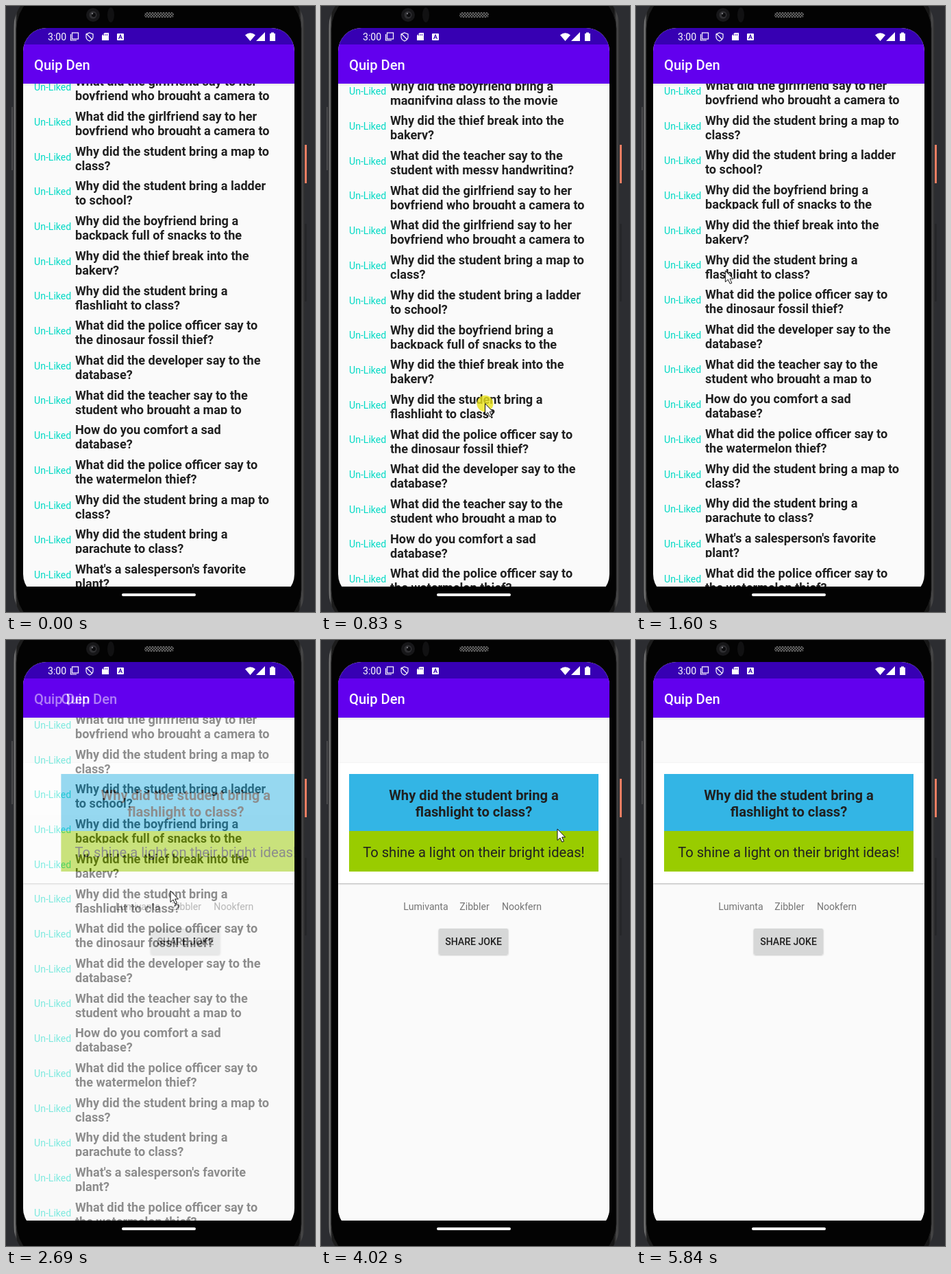
Write an HTML page that moves like this. It is 451 by 882 pixels and loops after 6.44 s.

```html
<!DOCTYPE html>
<html lang="en">
<head>
<meta charset="utf-8">
<title>Joke list</title>
<style>
html, body { margin: 0; width: 100%; height: 100%; overflow: hidden; background: #2c2d31; }
svg { display: block; font-family: Roboto, sans-serif; }
#stage { position: absolute; left: 0; top: 0; }
.bold { font-weight: 700; fill: #202020; }
.medium { font-weight: 500; }
.mid { text-anchor: middle; }
.like { font-size: 14.1px; fill: #03dac5; }
.joke { font-size: 18.1px; }
.large { font-size: 20.15px; }
.small { font-size: 14.1px; }
</style>
</head>
<body>
<svg id="stage" width="451" height="882" viewBox="0 0 451 882">
  <defs>
    <linearGradient id="rim">
      <stop offset="0" stop-color="#3a3a3b"/><stop offset=".004" stop-color="#7c7c7c"/>
      <stop offset=".012" stop-color="#1c1c1c"/><stop offset=".98" stop-color="#161616"/>
      <stop offset=".99" stop-color="#4b4b4c"/><stop offset="1" stop-color="#2a2a2b"/>
    </linearGradient>
    <pattern id="mesh" width="4" height="4" patternUnits="userSpaceOnUse">
      <rect width="4" height="4" fill="#1c1c1c"/>
      <path d="M0 0L4 4M4 0L0 4" stroke="#6a6a6a" stroke-width=".9"/>
    </pattern>
    <linearGradient id="shade" x2="0" y2="1">
      <stop offset="0" stop-opacity=".08"/><stop offset="1" stop-opacity="0"/>
    </linearGradient>
    <clipPath id="glass"><rect x="25" y="32" width="396" height="829" rx="34"/></clipPath>
    <clipPath id="body"><rect x="25" y="113" width="396" height="732"/></clipPath>
    <filter id="soft" x="-10%" y="-20%" width="120%" height="150%">
      <feDropShadow dx="0" dy="1" stdDeviation="1.3" flood-opacity=".3"/>
    </filter>
  </defs>

  <rect width="451" height="882" fill="#2c2d31"/>
  <rect x="8" y="147" width="2" height="92" fill="#4a4a4c"/>
  <rect x="435" y="202" width="4" height="56" fill="#ee7e63"/>
  <rect x="435" y="317" width="4" height="113" rx="1" fill="#252629"/>
  <rect x="11" y="-27" width="425" height="937" rx="60" fill="url(#rim)"/>
  <rect x="15" y="-23" width="416" height="929" rx="56" fill="#030303" stroke="#1c1c1c"/>
  <circle cx="127" cy="13" r="10" fill="#171719"/>
  <circle cx="127" cy="13" r="5.5" fill="#303033"/>
  <circle cx="128" cy="13" r="3" fill="#0c0c0e"/>
  <circle cx="126" cy="11" r="1.2" fill="#77777c"/>
  <ellipse cx="153" cy="13" rx="5" ry="11" fill="#111112"/>
  <rect x="202" y="9" width="43" height="8" rx="4" fill="url(#mesh)"/>
  <rect x="169" y="855" width="108" height="4" rx="2" fill="#fff"/>

  <g clip-path="url(#glass)">
    <rect x="25" y="32" width="396" height="813" fill="#fafafa"/>
    <rect x="25" y="32" width="396" height="24" fill="#3700b3"/>
    <rect x="25" y="56" width="396" height="57" fill="#6200ee"/>
    <g fill="#fff">
      <text class="small" x="61" y="49.5">3:00</text>
      <g fill="none" stroke="#fff" stroke-width="1.2">
        <rect x="96.5" y="39" width="9" height="9"/>
        <path d="M94.5 41V50H103M122 39L127 41V45Q127 49 122 51Q117 49 117 45V41ZM118 41L126 49"/>
      </g>
      <path d="M144 39H150V50H140V43Z"/>
      <rect x="162" y="40" width="10" height="10" rx="1"/>
      <path d="M349 42.3Q356.5 36 364 42.3L356.5 51ZM365 51L378 38V51ZM385 40H387V38.5H391V40H393V51H385Z"/>
    </g>
    <g fill="none" stroke="#3700b3">
      <path d="M164.5 48L167 42L169.5 48M165.5 46H168.5" stroke-width="1.2"/>
      <path d="M142.5 43V41M145 43V41M147.5 43V41"/>
    </g>

    <text class="medium large" x="41" y="92.5" fill="#fff">Quip Den</text>
    <g clip-path="url(#body)"><g id="rows"></g></g>

    <g id="detail">
      <rect x="25" y="56" width="396" height="57" fill="#6200ee"/>
      <rect x="25" y="113" width="396" height="732" fill="#fafafa"/>
      <rect x="25" y="179" width="396" height="175" fill="#fff" filter="url(#soft)"/>
      <g id="slide">
        <text class="medium large" x="41" y="92.5" fill="#fff">Quip Den</text>
        <rect x="41" y="195" width="364" height="83" fill="#33b5e5"/>
        <rect x="41" y="278" width="364" height="59" fill="#9c0"/>
        <g class="large mid">
          <text class="bold" x="223" y="233">Why did the student bring a</text>
          <text class="bold" x="223" y="256.5">flashlight to class?</text>
          <text x="223" y="316" fill="#202020">To shine a light on their bright ideas!</text>
        </g>
        <g class="small mid" fill="#757575">
          <text x="153" y="393">Lumivanta</text>
          <text x="224" y="393">Zibbler</text>
          <text x="293" y="393">Nookfern</text>
        </g>
        <rect x="172" y="420" width="101" height="37.5" rx="2" fill="#d6d7d7" filter="url(#soft)"/>
        <text class="small medium mid" x="222.5" y="444" fill="#202020">SHARE JOKE</text>
      </g>
    </g>
    <rect x="25" y="113" width="396" height="4" fill="url(#shade)"/>
  </g>

  <g id="pointer">
    <circle id="spot" r="12" fill="#ebe41c" opacity=".8"/>
    <path d="M0 0V16.5L4 13L6.8 19L9.5 18L6.7 12H11.5Z" fill="#fff" stroke="#111" stroke-linejoin="round"/>
  </g>
</svg>
<script>
const LOOP = 6440, TICK = 70, PITCH = 50.7;
const $ = id => document.getElementById(id);

const student = "Why did the student bring a";
const camera = "What did the girlfriend say to her|boyfriend who brought a camera to";
const thief = "Why did the thief break into the|bakery?";
const melon = "What did the police officer say to|the watermelon thief?";
const map = student + " map to|class?";
const jokes = [
  "Why did the boyfriend bring a|magnifying glass to the movie",
  thief,
  "What did the teacher say to the|student with messy handwriting?",
  camera, camera, map,
  student + " ladder|to school?",
  "Why did the boyfriend bring a|backpack full of snacks to the",
  thief,
  student + "|flashlight to class?",
  "What did the police officer say to|the dinosaur fossil thief?",
  "What did the developer say to the|database?",
  "What did the teacher say to the|student who brought a map to",
  "How do you comfort a sad|database?",
  melon, map,
  student + "|parachute to class?",
  "What's a salesperson's favorite|plant?",
  melon
];

// The nested svg cuts the descenders of each second line.
$("rows").innerHTML = jokes.map((joke, i) => {
  const [first, second] = joke.split("|");
  return `<g transform="translate(0 ${i * PITCH})">
    <text class="like" x="41" y="5">Un-Liked</text>
    <svg x="101" y="-20" width="310" height="39.5">
      <text class="joke bold" y="18.3">${first}</text>
      <text class="joke bold" y="39.3">${second}</text>
    </svg></g>`;
}).join("");

const between = (t, a, b) => t >= a && t < b;
const progress = (t, a, b) => Math.min(1, Math.max(0, (t - a) / (b - a)));
const ease = (t, a, b) => {
  const p = progress(t, a, b);
  return p * p * (3 - 2 * p);
};

// Drag down, drag back up, then a short fling.
const scroll = t =>
  -34 + 167 * ease(t, 140, 620) - 202 * ease(t, 810, 1050) - 10 * ease(t, 1050, 1220);

// Each move glides to (x, y); a sine bends its way sideways.
const moves = [
  { from: 140, to: 620, x: 240, y: 588 },
  { from: 810, to: 1050, x: 228, y: 370 },
  { from: 1390, to: 2030, x: 228, y: 370, dx: -129, dy: 20 },
  { from: 2030, to: 2200, x: 240, y: 365 },
  { from: 2900, to: 3320, x: 150, y: 255 },
  { from: 3390, to: 3980, x: 345, y: 275, dy: -30 },
  { from: 4090, to: 4730, x: 222, y: 450, dx: 75, waves: 2 },
  { from: 4800, to: 5420, x: 165, y: 480, dx: 115, dy: -200, waves: 2 },
  { from: 5490, to: 5810, x: 445, y: 880 }
];

function pointerAt(t) {
  let x = 243, y = 424;
  for (const m of moves) {
    const p = ease(t, m.from, m.to);
    const bend = Math.sin(Math.PI * p * (m.waves || 1));
    x += (m.x - x) * p + (m.dx || 0) * bend;
    y += (m.y - y) * p + (m.dy || 0) * bend;
  }
  return [x, y];
}

const move = (id, x, y) => $(id).setAttribute("transform", `translate(${x} ${y})`);
const show = (id, on) => $(id).setAttribute("display", on ? "inline" : "none");

function draw(time) {
  const t = Math.round(time / TICK) * TICK;
  move("rows", 0, scroll(t));
  move("slide", 41 * (1 - progress(t, 2650, 3150)) ** 2, 0);
  $("detail").setAttribute("opacity", progress(t, 2590, 2730));
  move("pointer", ...pointerAt(t));
  show("pointer", between(t, 140, 5810));
  show("spot", t < 1050 || between(t, 2300, 2410));
}

let start;
function loop(now) {
  start ??= now;
  draw((now - start) % LOOP);
  requestAnimationFrame(loop);
}
requestAnimationFrame(loop);
</script>
</body>
</html>
```
